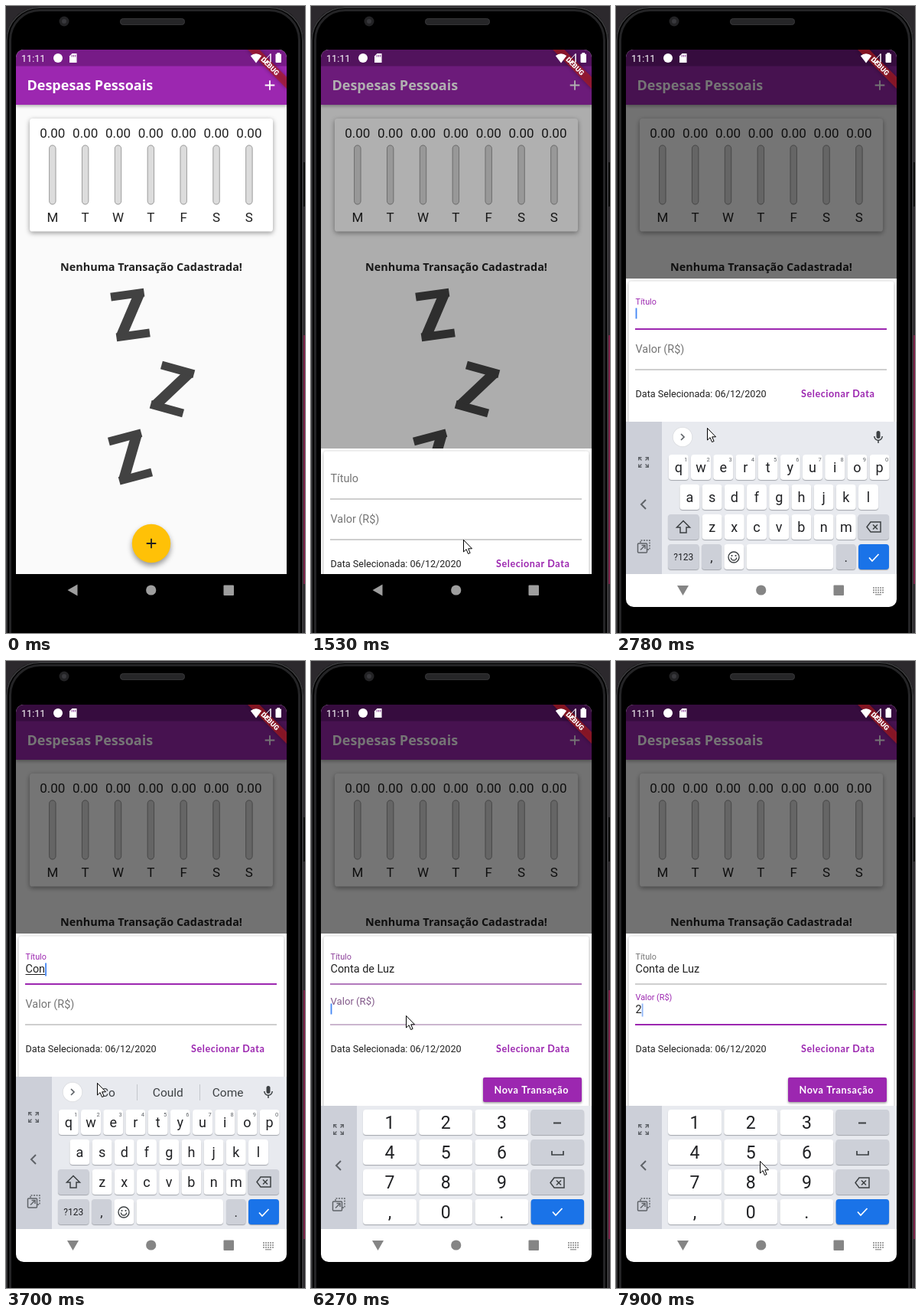
These frames come from a looping animation (391 by 819 pixels, 7.99 s). An HTML page with a canvas:

```html
<!DOCTYPE html>
<html lang="pt">
<head>
<meta charset="utf-8">
<title>Despesas Pessoais</title>
<style>
html, body { margin: 0; width: 100%; height: 100%; overflow: hidden; background: #000; }
canvas { display: block; width: 391px; height: 819px; }
</style>
</head>
<body>
<canvas id="stage" width="391" height="819"></canvas>
<script>
const c = document.getElementById('stage').getContext('2d');
const LOOP = 7990, REFRESH = 76.4;
const FLOOR = 742;
const OPEN_AT = 1438, TAP_TITLE = 2400, TAP_VALUE = 6185, TYPE_AT = 3390, KEY_GAP = 155, DIGIT_AT = 7440;
const PHRASE = 'Conta de Luz';
const PURPLE = [156, 39, 176], GREY = [117, 117, 117], RULE = [148, 148, 148];
const INK = '#212121', KEY_INK = '#3c4043', SOFT = '#cdd0d8', BLUE = '#1a73e8';
const ROBOTO = 'Roboto, sans-serif', OPEN = '"Open Sans", sans-serif', LATO = 'Lato, sans-serif';

// Pointer trips: [start, end, x, y]
const trips = [
  [690, 1400, 199.5, 697.5],
  [1690, 2200, 120.5, 553.5],
  [2260, 2320, 119.5, 551.5],
  [5600, 6180, 124.5, 463.5],
  [6480, 7220, 183, 611],
  [7470, 7840, 188.5, 653.5]];

const hints = {
  C: 'C Can Come', Co: 'Co Could Come', Con: 'Con Come Can', Cont: 'Cont Contact Control',
  Conta: 'Conta Contact Count', d: 'd do did', de: 'de do did',
  L: 'L Love Like', Lu: 'Lu Luck Lunch', Luz: 'Luz Luiz Liz', '': 'and the is' };

const clamp = v => Math.min(1, Math.max(0, v));
const lerp = (a, b, p) => a + (b - a) * p;
const smooth = u => u * u * (3 - 2 * u);
const easeOut = u => 1 - (1 - u) ** 3;
const span = (t, start, length) => clamp((t - start) / length);
const mix = (a, b, p) => `rgb(${a.map((v, i) => Math.round(lerp(v, b[i], p)))})`;
const typed = t => PHRASE.slice(0, Math.max(0, Math.floor((t - TYPE_AT) / KEY_GAP) + 1));

function box(x, y, w, h, r, fill, shadow) {
  c.save();
  if (shadow) [c.shadowOffsetY, c.shadowBlur, c.shadowColor] = shadow;
  c.fillStyle = fill;
  c.beginPath();
  c.roundRect(x, y, w, h, r);
  c.fill();
  c.restore();
}
function frame(x, y, w, h, r, color, width) {
  c.strokeStyle = color;
  c.lineWidth = width;
  c.beginPath();
  c.roundRect(x, y, w, h, r);
  c.stroke();
}
function trace(pts) {
  c.beginPath();
  for (let i = 0; i < pts.length; i += 2) c.lineTo(pts[i], pts[i + 1]);
}
function line(color, width, ...pts) {
  trace(pts);
  c.strokeStyle = color;
  c.lineWidth = width;
  c.stroke();
}
function poly(color, ...pts) {
  trace(pts);
  c.fillStyle = color;
  c.fill();
}
function outline(color, width, ...pts) { line(color, width, ...pts, ...pts.slice(0, 4)); }
function disc(x, y, r, fill, shadow) { box(x - r, y - r, 2 * r, 2 * r, r, fill, shadow); }
function smile(x, y, r, color) {
  c.beginPath();
  c.arc(x, y, r, 0, Math.PI);
  c.strokeStyle = color;
  c.lineWidth = 1.5;
  c.stroke();
}
function text(s, x, y, font, color, align = 'left', spacing = 0) {
  c.font = font;
  c.fillStyle = color;
  c.textAlign = align;
  c.letterSpacing = spacing + 'px';
  c.fillText(s, x, y);
  c.letterSpacing = '0px';
}
function at(x, y, turn, draw) {
  c.save();
  c.translate(x, y);
  c.rotate(turn * Math.PI / 180);
  draw();
  c.restore();
}
function plus(x, y, color) {
  box(x - 6.3, y - 0.9, 12.6, 1.8, 0, color);
  box(x - 0.9, y - 6.3, 1.8, 12.6, 0, color);
}

function phone() {
  box(0, 0, 391, 819, 0, '#2c292d');
  box(389, 430, 2, 325, 0, '#7b2046');
  box(388, 204, 3, 58, 1, '#0a0a0a');
  box(0, 1, 389, 900, 44, '#000');
  frame(1, 2, 387, 900, 43, '#38383a', 2);
  frame(5.5, 5.5, 378, 900, 39, '#242426', 3);
  disc(76, 20, 6.5, '#232325');
  disc(76, 20, 3, '#38383c');
  box(149, 16, 85, 9, 4.5, '#262628');
  frame(149.5, 16.5, 84, 8, 4, '#343436', 1);
}

// A "Z" made of two bars and a slanted stroke
function sleepy(x, y, turn) {
  const w = 22, h = 32, bar = 10.8;
  at(x, y, turn, () => {
    for (const side of [-1, 1]) box(-w, side < 0 ? -h : h - bar, 2 * w, bar, 0, '#424242');
    poly('#424242', w, bar - h - 2, w - 16, bar - h - 2, -w, h - bar + 2, 16 - w, h - bar + 2);
  });
}

function home() {
  box(13, 57, 354, FLOOR - 57, 0, '#fafafa');
  box(13, 70, 354, 59, 0, '#9c27b0', [2, 4, 'rgba(0,0,0,.3)']);
  box(13, 57, 354, 21.6, 0, '#771b87');
  text('Despesas Pessoais', 27.4, 110, '700 18.03px ' + OPEN, '#fff');
  plus(345, 103.5, '#fff');

  box(31, 147, 318, 147.5, 3.6, '#fff', [2, 6, 'rgba(0,0,0,.4)']);
  [...'MTWTFSS'].forEach((day, i) => {
    const x = 60.8 + i * 42.85;
    text('0.00', x, 172, '17px ' + ROBOTO, INK, 'center');
    box(x - 4.5, 181.5, 9, 78, 4.5, '#dcdcdc');
    frame(x - 4.2, 182, 8.4, 77, 4.2, '#9e9e9e', 1);
    text(day, x, 282, '17px ' + ROBOTO, INK, 'center');
  });

  text('Nenhuma Transação Cadastrada!', 190, 346, '700 14.42px ' + OPEN, INK, 'center');
  sleepy(162.5, 403.5, -8);
  sleepy(217.5, 500.5, 15.5);
  sleepy(162.5, 589, -15);
  disc(190, 702, 25.2, '#ffc107', [4, 7, 'rgba(0,0,0,.4)']);
  plus(190, 702, INK);
}

// Caret strength: lit for half of each second, fading shortly before it goes dark
function blink(ms) {
  const phase = ms % 1000;
  return ms < 0 || phase >= 500 ? 0 : clamp(1 - (phase - 400) / 150);
}

// p: how far the label has floated up, focus: how active the field is
function field(label, y, p, focus, value, caret, composing) {
  text(label, 25.5, lerp(y - 22, y - 32.5, p), `${lerp(14.42, 10.8, p)}px ${ROBOTO}`, mix(GREY, PURPLE, focus));
  line(mix(RULE, PURPLE, focus), lerp(0.9, 1.8, focus), 25, y, 354, y);
  text(value, 25.5, y - 15, '14.42px ' + ROBOTO, INK);
  const end = 25.5 + c.measureText(value).width;
  if (composing) {
    const start = 25.5 + c.measureText(value.slice(0, value.lastIndexOf(' ') + 1)).width;
    line(INK, 1, start, y - 12.5, end, y - 12.5);
  }
  c.globalAlpha = caret;
  box(end + 0.1, y - 27.5, 1.8, value ? 17 : 14, 0, '#4285f4');
  c.globalAlpha = 1;
}

function sheet(t, time, rise, lift) {
  const top = Math.round(FLOOR - 239 * rise - 147 * lift);
  const first = smooth(span(t, TAP_TITLE + 20, 200));
  const second = smooth(span(t, TAP_VALUE, 200));
  const value = typed(time), digit = time >= DIGIT_AT ? '2' : '';
  const lastKey = value ? TYPE_AT + (value.length - 1) * KEY_GAP : 2540;
  const onTitle = t < TAP_VALUE + 60;
  box(13, top, 354, 800 - top, 0, '#fff');
  box(16.6, top + 3.6, 346.8, 231.5, 3.6, '#fff', [1, 4, 'rgba(0,0,0,.35)']);
  field('Título', top + 66, first, first * (1 - second), value, onTitle ? blink(time - lastKey) : 0, onTitle);
  field('Valor (R$)', top + 119, second, second, digit,
    onTitle ? 0 : blink(time - (digit ? DIGIT_AT : TAP_VALUE + 60)));
  text('Data Selecionada: 06/12/2020', 25.5, top + 155, '12.62px ' + ROBOTO, INK);
  text('Selecionar Data', 242, top + 155, '700 12.62px ' + LATO, '#9c27b0', 'left', 0.55);
  box(225, top + 188, 129, 32, 2, '#9c27b0', [1.5, 3, 'rgba(0,0,0,.4)']);
  text('Nova Transação', 239.5, top + 208.5, '700 12.62px ' + LATO, '#fff', 'left', 0.65);
}

const rowY = r => 586 + 39 * r;
function key(x, r, w, label = '', fill = '#fff', size = 17) {
  box(x, rowY(r), w, 33, 4, fill, [1, 1, 'rgba(60,64,72,.4)']);
  text(label, x + w / 2, rowY(r) + 16.5 + size * 0.36, `${size}px ${ROBOTO}`, '#202124', 'center');
}
function check(x, y) { line('#fff', 1.7, x - 6, y, x - 2, y + 4.5, x + 6.5, y - 4.5); }
function backspace(x, y) {
  outline(KEY_INK, 1.5, x - 9, y, x - 4, y - 6.5, x + 9, y - 6.5, x + 9, y + 6.5, x - 4, y + 6.5);
  for (const s of [-3, 3]) line(KEY_INK, 1.5, x - 1, y - s, x + 5, y + s);
}

// Keyboard background with the tool strip on the left
function board(top, first) {
  const ink = '#5f6368', mid = (first + 706) / 2;
  box(13, top, 354, FLOOR - top, 0, '#e8eaef');
  box(13, top, 47, FLOOR - top, 0, '#cccfd8');
  for (let i = 0; i < 4; i++) at(36, first, i * 90, () => {
    line(ink, 1.4, 2.5, -2.5, 6, -6);
    line(ink, 1.4, 2.5, -6.3, 6.3, -6.3, 6.3, -2.5);
  });
  line(ink, 2, 39, mid - 6, 33, mid, 39, mid + 6);
  at(36, 706 + (first - 596) / 4, 0, () => {
    c.setLineDash([2, 1.5]);
    line(ink, 1.4, -4, -5, -4, -8, 8, -8, 8, 4, 5, 4);
    c.setLineDash([]);
    frame(-7.5, -4, 12, 12, 1, ink, 1.5);
    line(ink, 1.4, -4, 4.5, 2, -1.5);
    line(ink, 1.4, -2.5, -1.5, 2, -1.5, 2, 3);
  });
}

function suggestions(time) {
  disc(87, 563, 12.5, '#fff', [0, 1, 'rgba(0,0,0,.25)']);
  line('#5f6368', 1.7, 85, 559, 89, 563, 85, 567);
  box(340.5, 555, 5, 10, 2.5, KEY_INK);
  smile(343, 562, 5.2, KEY_INK);
  line(KEY_INK, 1.5, 343, 567, 343, 571);
  const known = typed(time - 120);
  if (!known) return;
  hints[known.split(' ').pop()].split(' ').forEach((word, i) => {
    const x = 133.5 + i * 78.3;
    text(word, x, 569, '15.5px ' + ROBOTO, KEY_INK, 'center');
    if (i) line('#c4c7cc', 1, 89.5 + i * 82, 553, 89.5 + i * 82, 574);
  });
}

function letters(time) {
  board(543, 596);
  suggestions(time);
  ['qwertyuiop', 'asdfghjkl', 'zxcvbnm'].forEach((row, r) => [...row].forEach((ch, i) => {
    const x = 213.2 + (i - (row.length - 1) / 2) * 29.2;
    key(x - 13, r, 26, ch, '#fff', 18);
    if (!r) text((i + 1) % 10, x + 9.5, rowY(0) + 9, '7.5px ' + ROBOTO, '#5f6368', 'center');
  }));
  key(68, 2, 40.5, '', SOFT);
  outline(KEY_INK, 1.5, 88, 672.5, 96.5, 681, 92, 681, 92, 688, 84, 688, 84, 681, 79.5, 681);
  key(316.5, 2, 40.5, '', SOFT);
  backspace(337, 680.5);
  key(68, 3, 40.5, '?123', SOFT, 12);
  key(112, 3, 26, ',', SOFT);
  key(141.3, 3, 26);
  frame(147, 713, 14, 14, 7, KEY_INK, 1.4);
  for (const s of [-2.5, 2.5]) disc(154 + s, 718, 1.1, KEY_INK);
  smile(154, 720.5, 3.6, KEY_INK);
  key(170.5, 3, 113.5);
  key(288, 3, 25.5, '.', SOFT);
  key(317, 3, 40, '', BLUE);
  check(337, 720.5);
}

function digits(time) {
  const pressed = time >= DIGIT_AT - 140 && time < DIGIT_AT ? '2' : '';
  board(581, 612);
  ['123', '456', '789', ',0.'].forEach((row, r) => {
    [...row].forEach((ch, i) => key(68 + i * 73.2, r, 70, ch, ch === pressed ? '#d9dce2' : '#fff', 23));
    key(287.6, r, 69.5, '', r === 3 ? BLUE : SOFT);
  });
  line(KEY_INK, 1.8, 317, 603.5, 327, 603.5);
  line(KEY_INK, 1.7, 315, 640, 315, 645, 330, 645, 330, 640);
  backspace(322, 681.5);
  check(322, 719.5);
}

function navBar(light) {
  const ink = light ? '#858585' : '#9e9e9e';
  box(13, FLOOR, 354, 43, [0, 0, 10, 10], light ? '#fff' : '#000');
  at(87.5, 763, light ? -90 : 0, () => poly(ink, -7, 0, 6, -7.5, 6, 7.5));
  disc(189.7, 763, 6.6, ink);
  box(284.5, 756.5, 13.5, 13.5, 1, ink);
  if (light) {
    for (let i = 0; i < 15; i++) box(336 + i % 5 * 3, 759 + Math.floor(i / 5) * 3, 2, 2, 0, '#a3a3a3');
    box(339, 768, 8, 1.5, 0, '#a3a3a3');
  }
}

function statusBar() {
  at(367, 57, 45, () => {
    box(-36, 25.2, 72, 10.8, 0, 'rgba(183,28,28,.63)', [0, 5, 'rgba(0,0,0,.5)']);
    text('DEBUG', 0, 33.8, '900 9.2px ' + ROBOTO, '#fff', 'center');
  });
  text('11:11', 20, 72.5, '12.62px ' + ROBOTO, '#fff');
  disc(68, 68, 6, '#fff');
  poly('#fff', 86.5, 62, 92.5, 62, 92.5, 74, 83, 74, 83, 65.5);
  for (let i = 0; i < 3; i++) line('#771b87', 0.9, 86.3 + i * 2.2, 64, 86.3 + i * 2.2, 66.5);
  c.beginPath();
  c.moveTo(327, 74.5);
  c.lineTo(319.8, 65);
  c.quadraticCurveTo(327, 59.5, 334.2, 65);
  c.fillStyle = '#fff';
  c.fill();
  outline('#fff', 1, 346, 62.5, 346, 73.5, 336, 73.5);
  box(352.5, 62.5, 7.5, 11.5, 1, '#fff');
  box(354.5, 61, 3.5, 2, 0, '#fff');
}

function arrow(t) {
  if (t < trips[0][0] - REFRESH / 2) return;
  let x = 234, y = 806;
  for (const [start, end, toX, toY] of trips) {
    const p = smooth(span(t, start, end - start));
    x = lerp(x, toX, p);
    y = lerp(y, toY, p);
  }
  at(x, y, 0, () => {
    const shape = [0, 0, 0, 15.5, 3.6, 12.2, 6, 18, 8.6, 17, 6.2, 11.3, 11, 11.3];
    poly('#fff', ...shape);
    outline('#000', 1, ...shape);
  });
}

// Motion advances once per screen refresh; typing follows the exact time
function render(time) {
  const t = Math.floor(time / REFRESH) * REFRESH;
  const rise = t < OPEN_AT + 50 ? 0 : easeOut(span(t, OPEN_AT, 280));
  const lift = easeOut(span(t, TAP_TITLE, 320));
  phone();
  c.save();
  c.beginPath();
  c.roundRect(13, 57, 354, FLOOR - 57, [10, 10, 0, 0]);
  c.clip();
  home();
  if (rise) {
    box(13, 57, 354, FLOOR - 57, 0, `rgba(0,0,0,${0.54 * rise ** 1.5})`);
    sheet(t, time, rise, lift);
  }
  if (lift) at(0, (1 - lift) * 200, 0, () => (t < TAP_VALUE + 60 ? letters : digits)(time));
  statusBar();
  c.restore();
  navBar(lift > 0);
  arrow(t);
}

function loop() {
  render(performance.now() % LOOP);
  requestAnimationFrame(loop);
}
loop();
</script>
</body>
</html>
```
